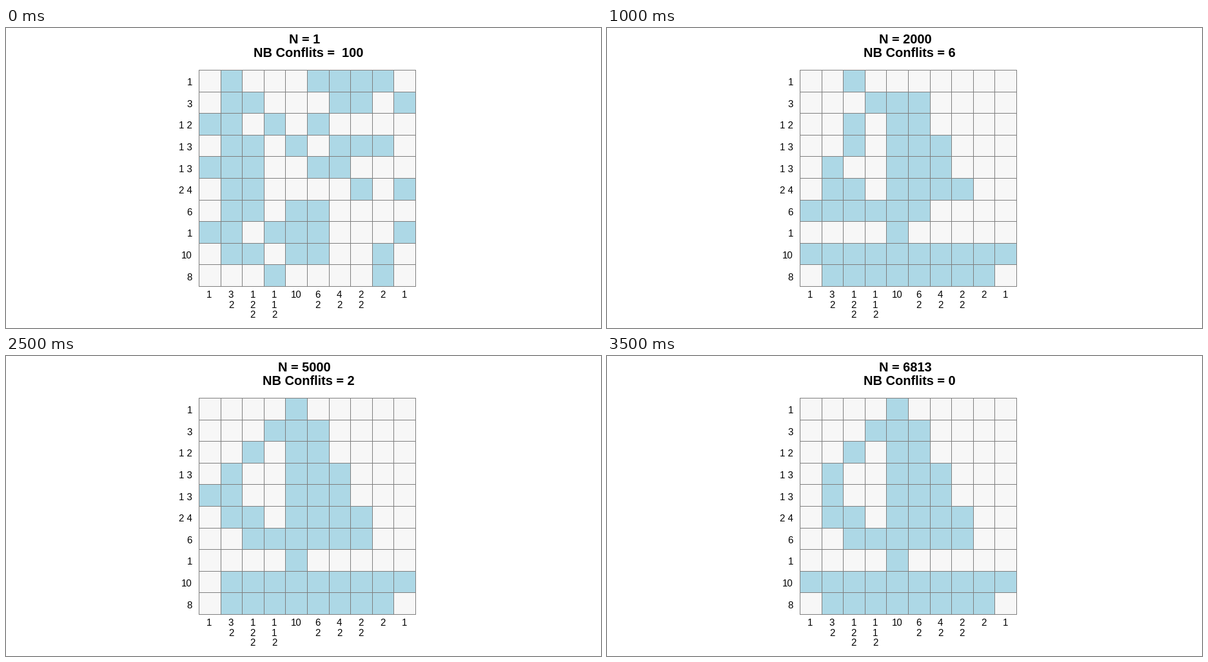
These frames come from a looping animation (923x466 px, 4000 ms). A matplotlib script:

```python
import matplotlib.pyplot as plt
from matplotlib.animation import FuncAnimation
from matplotlib.patches import Rectangle

W, H, DPI = 923, 466, 64
LEFT, TOP, CELL, N = 299, 65, 33.6, 10
ON, OFF, LINE = "#add8e6", "#f7f7f7", "#7f7f7f"

ROW_CLUES = ["1", "3", "1 2", "1 3", "1 3", "2 4", "6", "1", "10", "8"]
COL_CLUES = ["1", "3 2", "1 2 2", "1 1 2", "10", "6 2", "4 2", "2 2", "2", "1"]

START = """
.#...####.
.##...##.#
##.#.#....
.##.#.###.
###..##...
.##....#.#
.##.##....
##.###...#
.##.##..#.
...#....#.
""".split()

EARLY = """
..#.......
...#.#....
...#.##...
..#.###...
..#.###..#
.##.####..
######....
....#.....
##########
.########.
""".split()

SOLVED = """
....#.....
...###....
..#.##....
.#..###...
.#..###...
.##.####..
..######..
....#.....
##########
.########.
""".split()


def flip(board, *cells):
    """Copy of the board with the given (row, col) cells toggled."""
    rows = [list(row) for row in board]
    for r, c in cells:
        rows[r][c] = "." if rows[r][c] == "#" else "#"
    return rows


NEAR = flip(SOLVED, (8, 0), (4, 0))

# (iteration, conflicts, board)
STEPS = [
    (1, " 100", START),
    (1000, 14, EARLY),
    (2000, 6, flip(SOLVED, (0, 2), (0, 4), (3, 1), (3, 2),
                   (6, 0), (6, 1), (6, 6), (6, 7))),
    (3000, 4, flip(SOLVED, (8, 0), (6, 9))),
    (4000, 2, flip(SOLVED, (8, 0), (0, 0))),
    (5000, 2, NEAR),
    (6000, 2, NEAR),
    (6813, 0, SOLVED),
]

plt.rcParams["font.family"] = "Liberation Sans"
plt.rcParams["text.hinting"] = "native"

fig = plt.figure(figsize=(W / DPI, H / DPI), dpi=DPI, facecolor="white")
ax = fig.add_axes([0, 0, 1, 1])
ax.set_xlim(0, W)
ax.set_ylim(H, 0)
ax.axis("off")


def edge(start, i):
    return round(start + CELL * i)


def box(x0, y0, x1, y1, color):
    rect = Rectangle((x0, y0), x1 - x0, y1 - y0, facecolor=color,
                     linewidth=0, antialiased=False)
    return ax.add_patch(rect)


def label(x, y, text, px=15, **style):
    return ax.text(x, y, text, fontsize=px * 72 / DPI, color="black",
                   va="baseline", **style)


# The grid lines are the gaps between cells on a grey square.
box(LEFT, TOP, edge(LEFT, N) + 1, edge(TOP, N) + 1, LINE)
cells = [[box(edge(LEFT, c) + 1, edge(TOP, r) + 1,
              edge(LEFT, c + 1), edge(TOP, r + 1), OFF)
          for c in range(N)] for r in range(N)]

for r, clue in enumerate(ROW_CLUES):
    label(289, 89.2 + CELL * r, clue, ha="right")
for c, clue in enumerate(COL_CLUES):
    for k, number in enumerate(clue.split()):
        label(315.4 + CELL * c, 419.3 + 15.4 * k, number, ha="center")

title = label(463.2, 24, "", px=20, ha="center", weight="bold")
subtitle = label(469, 45, "", px=20, ha="center", weight="bold")


def draw(frame):
    count, conflicts, board = STEPS[frame]
    title.set_text(f"N = {count}")
    subtitle.set_text(f"NB Conflits = {conflicts}")
    for r in range(N):
        for c in range(N):
            cells[r][c].set_facecolor(ON if board[r][c] == "#" else OFF)
    return []


anim = FuncAnimation(fig, draw, frames=len(STEPS), interval=500,
                     repeat=True, repeat_delay=0)
plt.show()
```
